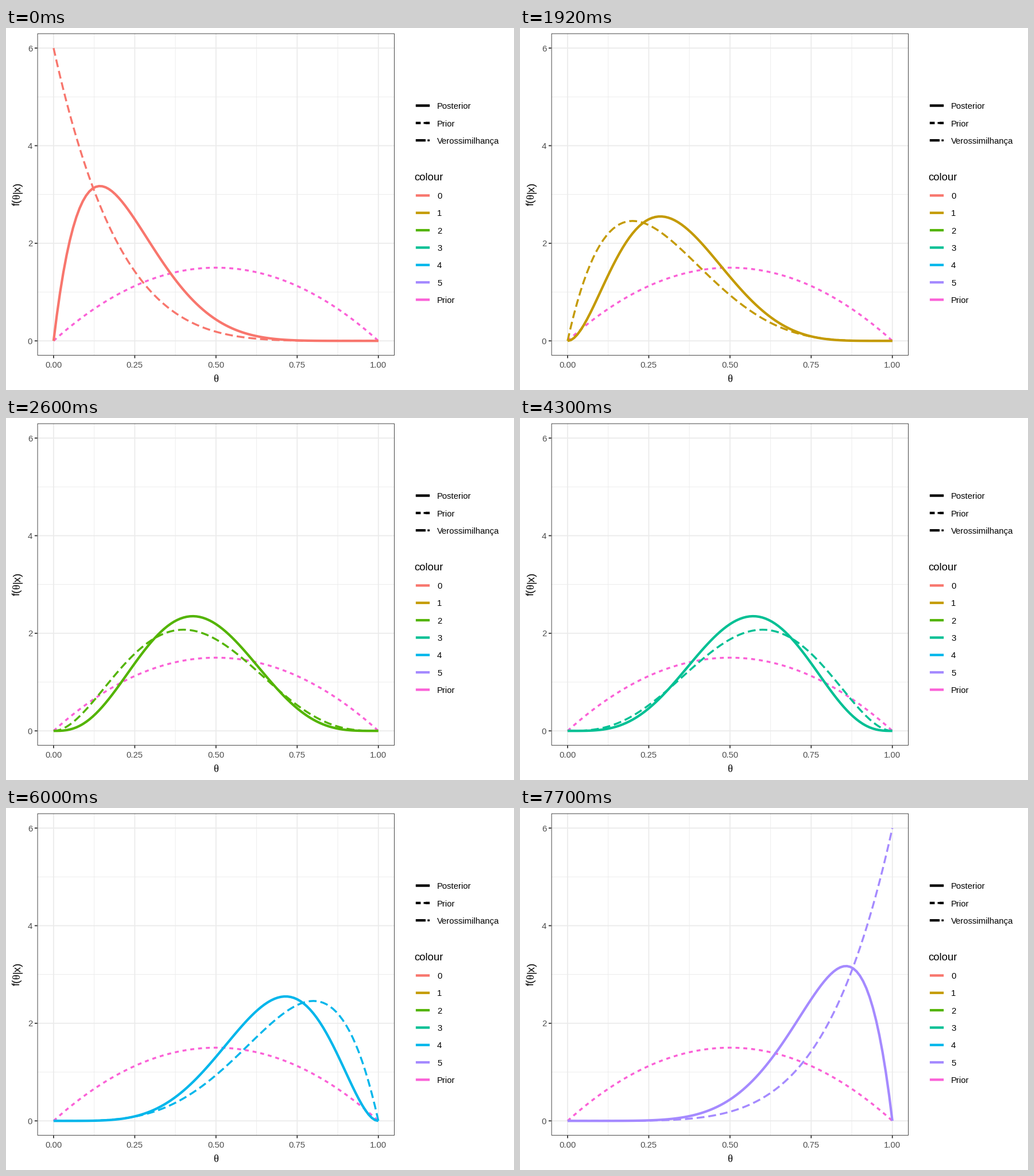
Write a matplotlib script that moves like this. It is 885 by 632 pixels and loops after 9300 ms.

```python
from math import gamma

import matplotlib.pyplot as plt
import numpy as np
from matplotlib.animation import FuncAnimation
from matplotlib.patches import Rectangle

WIDTH, HEIGHT, DPI = 885, 632, 100
PT = 72 / DPI  # points per pixel
LEFT, RIGHT, TOP, BOTTOM = 54.6, 677.0, 9.5, 571.8
THICK, MEDIUM, THIN = 4.27, 3.41, 0.9
SMALL, LARGE = 14.93, 18.67
SOLID, SHORT, LONG = "-", (0, (2, 2)), (0, (4, 2))
HUES = ["#F8766D", "#C49A00", "#53B400", "#00C094", "#00B6EB", "#A58AFF", "#FB61D7"]
GRID, DARK, LABEL = "#EBEBEB", "#333333", "#4D4D4D"

TRIALS = 5
FRAME_MS, FRAMES = 100, 93
CHANGES = [9, 26, 43, 60, 77]

theta = np.linspace(0, 1, 101)


def px(x):
    return LEFT + (RIGHT - LEFT) * (x + 0.05) / 1.1


def py(y):
    return BOTTOM - (BOTTOM - TOP) * (y + 0.3) / 6.6


def beta_pdf(a, b):
    return gamma(a + b) / gamma(a) / gamma(b) * theta ** (a - 1) * (1 - theta) ** (b - 1)


fig = plt.figure(figsize=(WIDTH / DPI, HEIGHT / DPI), dpi=DPI, facecolor="white")
ax = fig.add_axes([0, 0, 1, 1])
ax.set(xlim=(0, WIDTH), ylim=(HEIGHT, 0))
ax.axis("off")


def line(xs, ys, color, width, style=SOLID, z=2):
    return ax.plot(xs, ys, color=color, lw=width * PT, ls=style, zorder=z,
                   solid_capstyle="butt", dash_capstyle="butt", snap=False)[0]


def text(x, y, label, size=SMALL, color="black", font="Liberation Sans", ha="left", angle=0):
    ax.text(x, y, label, fontsize=size * PT, color=color, family=font, ha=ha,
            va="baseline", rotation=angle, rotation_mode="anchor")


def draw_panel():
    for x in np.arange(0.125, 1, 0.25):
        line([px(x)] * 2, [TOP, BOTTOM], GRID, THIN, z=0)
    for y in (1, 3, 5):
        line([LEFT, RIGHT], [py(y)] * 2, GRID, THIN, z=0)
    for x in np.arange(0, 1.1, 0.25):
        line([px(x)] * 2, [TOP, BOTTOM], GRID, 2 * THIN, z=1)
        line([px(x)] * 2, [BOTTOM, BOTTOM + 4.67], DARK, 2 * THIN)
        text(px(x), 593.3, f"{x:.2f}", color=LABEL, ha="center")
    for y in (0, 2, 4, 6):
        line([LEFT, RIGHT], [py(y)] * 2, GRID, 2 * THIN, z=1)
        line([LEFT - 4.67, LEFT], [py(y)] * 2, DARK, 2 * THIN)
        text(46.2, py(y) + 5.6, str(y), color=LABEL, ha="right")
    inset = THIN / 2
    ax.add_patch(Rectangle((LEFT + inset, TOP + inset), RIGHT - LEFT - THIN, BOTTOM - TOP - THIN,
                           fill=False, ec=DARK, lw=THIN * PT, snap=False, zorder=6))

    text(365.8, 618, "θ", LARGE, font="Liberation Serif", ha="center")
    text(24, 310.5, "f(", LARGE, angle=90)
    text(24, 299, "θ", LARGE, font="Liberation Serif", angle=90)
    text(24, 288.6, "|x)", LARGE, angle=90)


def draw_legend():
    key, step = [713.9, 738.1], 30.33
    styles = [("Posterior", SOLID), ("Prior", SHORT), ("Verossimilhança", LONG)]
    for i, (label, style) in enumerate(styles):
        y = 135.5 + step * i
        for width in (MEDIUM, THICK):
            line(key, [y, y], "black", width, style)
        text(751, y + 5.7, label)

    text(710.8, 266, "colour", LARGE)
    for i, color in enumerate(HUES):
        y = 292.4 + step * i
        line(key, [y, y], color, THICK)
        text(751, y + 5.7, "Prior" if i > TRIALS else str(i))


draw_panel()
draw_legend()
xs = px(theta)
line(xs, py(beta_pdf(2, 2)), HUES[-1], MEDIUM, SHORT, z=3)
likelihood = line(xs, xs, HUES[0], MEDIUM, LONG, z=4)
posterior = line(xs, xs, HUES[0], THICK, z=5)


def update(frame):
    hits = sum(frame >= change for change in CHANGES)
    misses = TRIALS - hits
    likelihood.set_ydata(py(beta_pdf(hits + 1, misses + 1)))
    posterior.set_ydata(py(beta_pdf(hits + 2, misses + 2)))
    for curve in (likelihood, posterior):
        curve.set_color(HUES[hits])
    return likelihood, posterior


anim = FuncAnimation(fig, update, frames=FRAMES, interval=FRAME_MS, repeat=True, repeat_delay=0)
plt.show()
```
